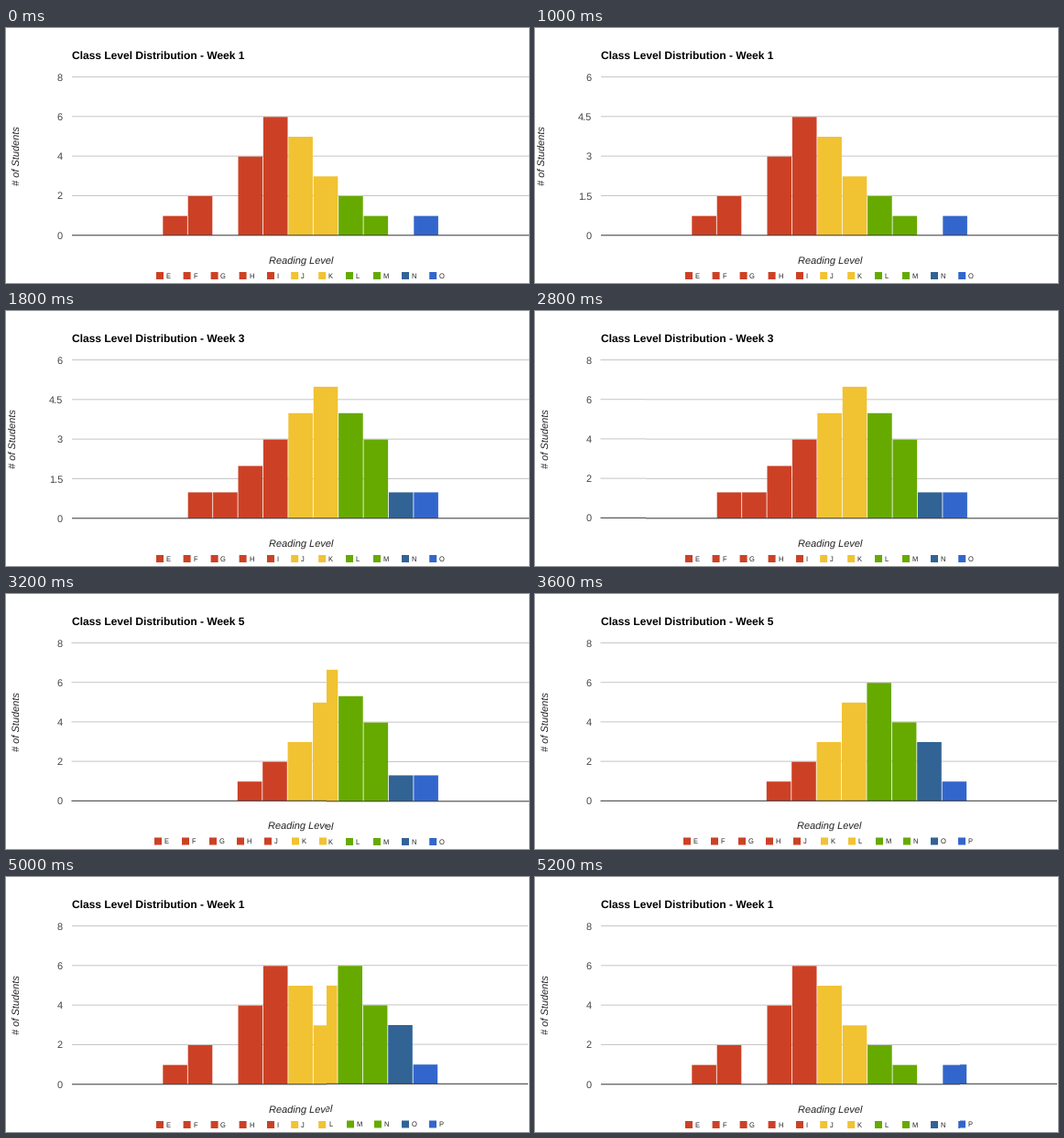
These frames come from a looping animation (571x279 px, 5400 ms). A matplotlib script:

```python
import matplotlib.pyplot as plt
from matplotlib.animation import FuncAnimation
from matplotlib.patches import Rectangle
from matplotlib.transforms import Bbox, TransformedBbox

WIDTH, HEIGHT = 571, 279
DPI = 64
PX = 72 / DPI  # points per pixel
STEP_MS = 200
HOLD_STEPS, STEPS_PER_CHART = 4, 9
WIPE_EDGES = [0, 121, 236, 350, 464]

RED, YELLOW, GREEN = "#cc4125", "#f1c232", "#66aa00"
NAVY, BLUE = "#316395", "#3366cc"
COLORS = [RED] * 5 + [YELLOW] * 2 + [GREEN] * 2 + [NAVY, BLUE]

UNEVEN_LEGEND = [164, 193.6, 223.6, 254.6, 285, 311.2, 341.2, 371, 401, 432, 462.2]
EVEN_LEGEND = [162 + 30 * i for i in range(11)]

plt.rcParams["font.family"] = "Liberation Sans"
plt.rcParams["text.hinting"] = "none"

fig = plt.figure(figsize=(WIDTH / DPI, HEIGHT / DPI), dpi=DPI, facecolor="white")
ax = fig.add_axes([0, 0, 1, 1])
ax.set_xlim(0, WIDTH)
ax.set_ylim(HEIGHT, 0)
ax.set_autoscale_on(False)
ax.axis("off")


def make_chart(week, levels, counts, ticks, ylabel_x, legend_xs, dx=0.0, dy=0.0):
    """Draw one bar chart and return all of its artists."""
    artists = []

    def text(x, y, label, size, color="#222222", **style):
        artists.append(ax.text(x, y, label, fontsize=size * PX, color=color,
                               va="baseline", **style))

    def rect(x, y, w, h, color):
        patch = Rectangle((x, y), w, h, facecolor=color, linewidth=0,
                          snap=False, zorder=2)
        artists.append(ax.add_patch(patch))

    def rule(y, color, zorder):
        artists.extend(ax.plot([72 + dx / 2, WIDTH + dx], [y, y], color=color,
                               linewidth=PX, solid_capstyle="butt",
                               snap=False, zorder=zorder))

    top, bottom = 53.5, 226.8 + dy
    row = (bottom - top) / 4
    for i, tick in enumerate(ticks):
        y = bottom - i * row
        rule(y, "#333333" if i == 0 else "#c6c6c6", 3 if i == 0 else 1)
        text(62, y + 4, f"{tick:g}", 11, "#444444", ha="right")

    unit = 4 * row / ticks[-1]
    for i, (count, color) in enumerate(zip(counts, COLORS)):
        if count:
            height = count * unit - 0.5
            rect(171.3 + dx * 0.7 + 27.4 * i, bottom - height, 26.6, height, color)

    for x, level, color in zip(legend_xs, levels, COLORS):
        rect(x, 267 + dy, 8, 8, color)
        text(x + 10.4, 273.8 + dy, level, 7.5)

    text(72 + dx / 3, 34, f"Class Level Distribution - Week {week}", 12,
         "black", weight="bold")
    text(322.3 + dx, 258.4 + dy, "Reading Level", 11, style="italic", ha="center")
    text(ylabel_x, 140 + dy / 2, "# of Students", 11, style="italic",
         ha="center", rotation=90, rotation_mode="anchor")
    return artists


EIGHTS = [0, 2, 4, 6, 8]
SIXES = [0, 1.5, 3, 4.5, 6]
charts = [
    make_chart(1, "EFGHIJKLMNO", [1, 2, 0, 4, 6, 5, 3, 2, 1, 0, 1],
               EIGHTS, 16, UNEVEN_LEGEND),
    make_chart(3, "EFGHIJKLMNO", [0, 1, 1, 2, 3, 4, 5, 4, 3, 1, 1],
               SIXES, 11.5, UNEVEN_LEGEND),
    make_chart(5, "EFGHJKLMNOP", [0, 0, 0, 1, 2, 3, 5, 6, 4, 3, 1],
               EIGHTS, 16, EVEN_LEGEND, dx=-1.0, dy=-0.5),
]


def show_between(artists, left, right):
    clip = TransformedBbox(Bbox([[left, 0], [right, HEIGHT]]), ax.transData)
    for artist in artists:
        artist.set_visible(right > left)
        artist.set_clip_on(True)
        artist.set_clip_box(clip)


def update(frame):
    current, step = divmod(frame, STEPS_PER_CHART)
    edge = WIPE_EDGES[max(0, step - HOLD_STEPS)]
    following = (current + 1) % len(charts)
    for i, artists in enumerate(charts):
        if i == current:
            show_between(artists, edge, WIDTH)
        elif i == following:
            show_between(artists, 0, edge)
        else:
            show_between(artists, 0, 0)
    return [artist for artists in charts for artist in artists]


animation = FuncAnimation(fig, update, frames=STEPS_PER_CHART * len(charts),
                          interval=STEP_MS, repeat=True, repeat_delay=0)
plt.show()
```
